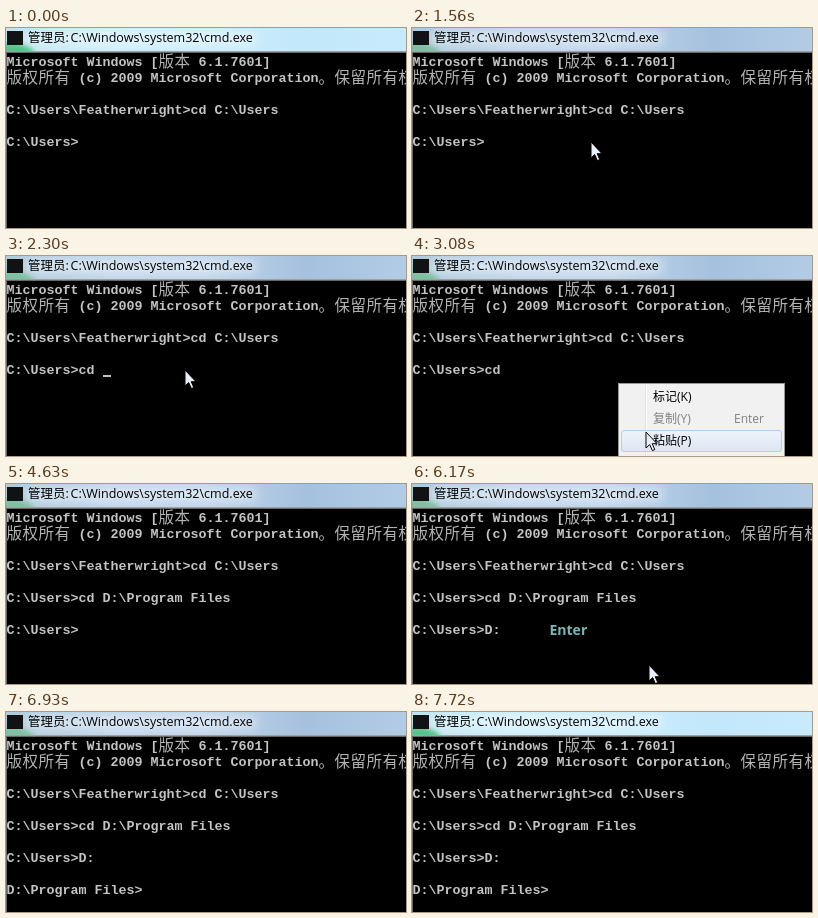
Write an HTML page with a canvas that moves like this. It is 400 by 200 pixels and loops after 7.84 s.

```html
<!DOCTYPE html>
<html lang="zh-CN">
<head>
<meta charset="utf-8">
<title>cmd</title>
<style>
html, body { margin: 0; width: 100%; height: 100%; overflow: hidden; background: #000; }
canvas { display: block; width: 400px; height: 200px; }
</style>
</head>
<body>
<canvas id="stage" width="400" height="200"></canvas>
<script>
const ctx = document.getElementById('stage').getContext('2d');
const LOOP = 7840;
const CJK = '"Noto Sans CJK SC", "Noto Sans CJK"';
const UI = `12px "Open Sans", ${CJK}, sans-serif`;
const CAPTION = `12.5px "Open Sans", ${CJK}, sans-serif`;
const MONO = 'bold 13.33px "Liberation Mono", monospace';
const HAN = `100 15.5px ${CJK}, sans-serif`;
const TEAL = '#78b9b7';

const HEADER = ['Microsoft Windows [版本 6.1.7601]',
  '版权所有 (c) 2009 Microsoft Corporation。保留所有权利。', '',
  'C:\\Users\\Featherwright>cd C:\\Users', ''];
const PROMPT = 'C:\\Users>';
const CD = PROMPT + 'cd D:\\Program Files';
const DRIVE = PROMPT + 'D:';
const LAST = 'D:\\Program Files>';

// Each scene holds until the next one starts.
const scenes = [
  { at: 0, lines: [PROMPT], clear: true },
  { at: 1560, lines: [PROMPT], mouse: [179, 114] },
  { at: 2300, lines: [PROMPT + 'cd '], mouse: [179, 114], caret: true },
  { at: 3080, lines: [PROMPT + 'cd '], mouse: [234, 176], menu: true },
  { at: 3850, lines: [CD], mouse: [237, 181], key: [236.5, 120] },
  { at: 4630, lines: [CD, '', PROMPT] },
  { at: 6170, lines: [CD, '', DRIVE], mouse: [237, 181], key: [137.5, 151] },
  { at: 6930, lines: [CD, '', DRIVE, '', LAST] },
  { at: 7720, lines: [CD, '', DRIVE, '', LAST], clear: true }
];

function rect(x, y, w, h, fill) {
  ctx.fillStyle = fill;
  ctx.fillRect(x, y, w, h);
}

function text(str, x, y, font, fill) {
  ctx.font = font;
  ctx.fillStyle = fill;
  ctx.fillText(str, x, y);
}

function gradient(x0, y0, x1, y1, ...colors) {
  const g = ctx.createLinearGradient(x0, y0, x1, y1);
  colors.forEach((c, i) => g.addColorStop(i / (colors.length - 1), c));
  return g;
}

function titleBar(clear) {
  const tones = clear
    ? ['#bfe4ee', '#cdeefc', '#ccedfd', '#c3e8fb', '#c8ebfc']
    : ['#afcadb', '#c0d5eb', '#c0d5eb', '#a6c1de', '#b2cce6'];
  rect(0, 0, 400, 23, gradient(0, 0, 400, 0, ...tones));

  // Wallpaper and text glow seen through the glass.
  ctx.save();
  ctx.beginPath();
  ctx.rect(0, 0, 400, 23);
  ctx.clip();
  ctx.filter = 'blur(2px)';
  ctx.fillStyle = clear ? '#55c48a' : '#7fbfa2';
  ctx.beginPath();
  ctx.ellipse(4, 25, 24, 10, 0, 0, Math.PI * 2);
  ctx.fill();
  ctx.filter = 'blur(5px)';
  rect(20, 4, 230, 13, 'rgba(255,255,255,.45)');
  ctx.restore();

  rect(1, 3, 16, 14, '#101214');
  text('管理员:', 22, 14, CAPTION, '#000');
  text('C:\\Windows\\system32\\cmd.exe', 64.5, 14, CAPTION, '#000');
}

// Console grid: 8px per Latin cell, 16px per Han cell.
function consoleLine(str, row) {
  let x = 1;
  const y = 38 + row * 16;
  for (const ch of str) {
    const wide = ch > '\u2e80';
    text(ch, x - 0.5, wide ? y + 1 : y, wide ? HAN : MONO, wide ? '#b4b4b4' : '#c4c4c4');
    x += wide ? 16 : 8;
  }
  return x;
}

function menu() {
  rect(206, 127, 167, 80, '#979797');
  rect(207, 128, 165, 80, '#f1f1f1');
  rect(233, 129, 1, 71, '#dfe0e0');
  rect(234, 129, 1, 71, '#fff');
  ctx.beginPath();
  ctx.roundRect(209.5, 174.5, 160, 21, 2.5);
  ctx.fillStyle = gradient(0, 175, 0, 196, '#eef3f9', '#dbe6f3');
  ctx.fill();
  ctx.strokeStyle = '#aecff7';
  ctx.lineWidth = 1;
  ctx.stroke();
  text('标记(K)', 241, 145, UI, '#000');
  text('复制(Y)', 241, 167, UI, '#808080');
  text('Enter', 322, 167, UI, '#808080');
  text('粘贴(P)', 241, 189, UI, '#000');
}

function pointer([x, y]) {
  const shape = [[0, 0], [0, 16], [3.7, 12.6], [6.4, 18.6], [8.8, 17.5], [6.2, 11.7], [11, 11.7]];
  ctx.beginPath();
  shape.forEach(([dx, dy]) => ctx.lineTo(x + dx, y + dy));
  ctx.closePath();
  ctx.fillStyle = '#e9effa';
  ctx.fill();
  ctx.strokeStyle = '#000';
  ctx.lineWidth = 1;
  ctx.stroke();
}

function draw(time) {
  const scene = scenes.findLast(s => s.at <= time);
  rect(0, 0, 400, 200, '#000');
  titleBar(scene.clear);
  rect(0, 23, 400, 1, '#a0a0a0');
  rect(0, 24, 400, 1, '#696969');
  rect(0, 24, 1, 176, '#696969');
  let end = 0;
  [...HEADER, ...scene.lines].forEach((line, row) => { end = consoleLine(line, row); });
  if (scene.caret) rect(end, 119, 8, 2, '#c0c0c0');
  if (scene.key) text('Enter', ...scene.key, 'bold 14px "Open Sans", sans-serif', TEAL);
  if (scene.menu) menu();
  if (scene.mouse) pointer(scene.mouse);
}

function tick() {
  draw(performance.now() % LOOP);
  requestAnimationFrame(tick);
}
tick();
</script>
</body>
</html>
```
